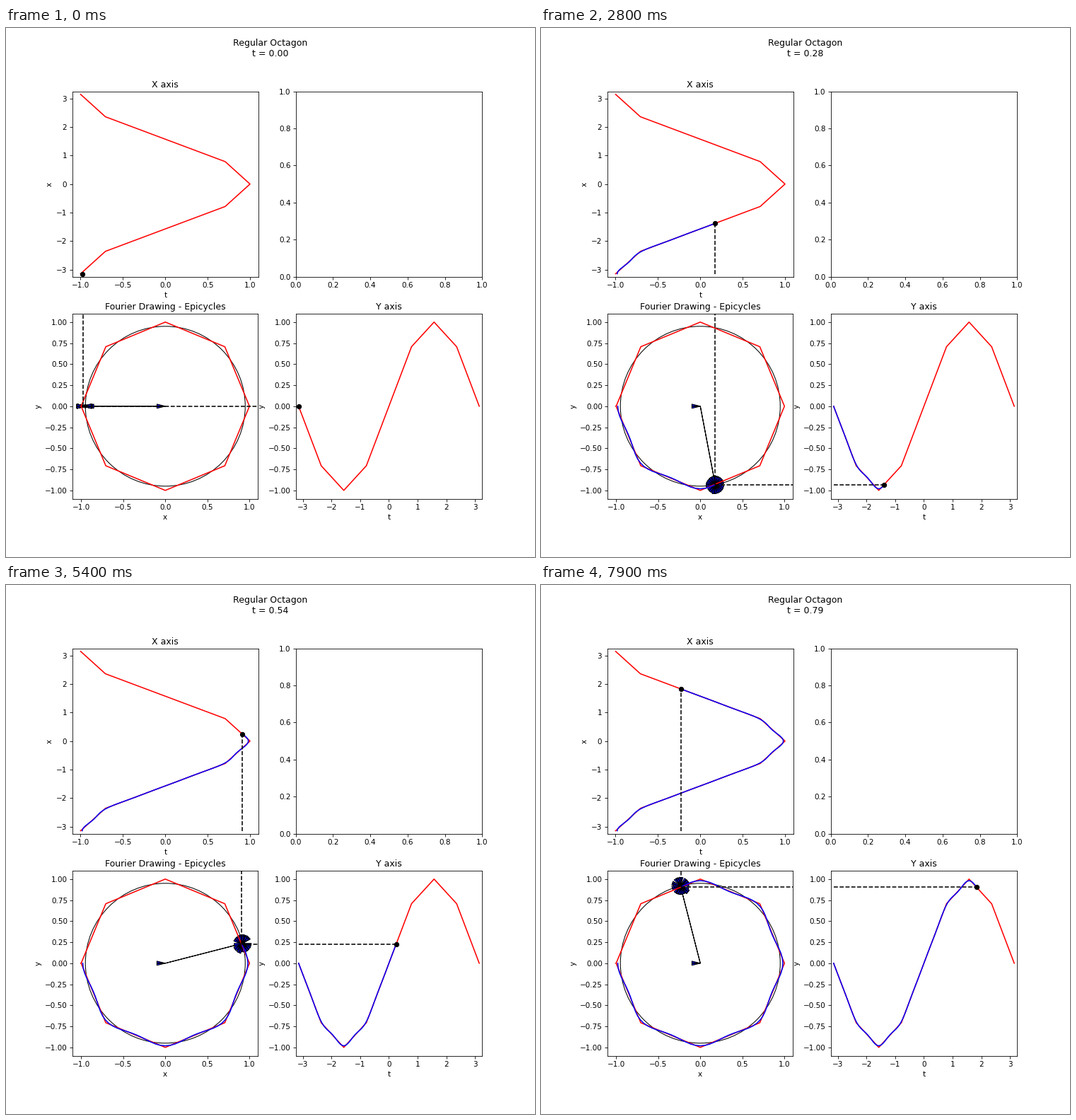
Animation of 748x748 px, one loop 8000 ms. Source, as a matplotlib script:

```python
import numpy as np
import matplotlib.pyplot as plt
from matplotlib.animation import FuncAnimation
from matplotlib.patches import Circle

FRAMES, STEPS = 80, 100
PI = np.pi
EDGE = 1.1

# Octagon traced once over [-pi, pi]
corners = np.linspace(-PI, PI, 9)
shape = np.exp(1j * corners)


def coefficient(n):
    """Fourier coefficient of the octagon; vanishing terms keep only a sign."""
    if n % 8 == 1:
        return (np.sin(PI / 8) / (PI / 8)) ** 2 / n ** 2
    sign = (-1) ** n if abs(n) < 8 else -(-1) ** n
    return sign * 1e-12


orders = [0] + [s * n for n in range(1, 11) for s in (1, -1)]
coefs = np.array([coefficient(n) for n in orders])
times = -PI + 2 * PI * np.arange(FRAMES) / STEPS
vectors = coefs * np.exp(1j * np.outer(times, orders))
joints = np.cumsum(vectors, axis=1)
path = joints[:, -1]

fig, ((ax_x, ax_off), (ax_xy, ax_y)) = plt.subplots(2, 2, figsize=(10, 10), dpi=74.8)
title = fig.suptitle("")


def setup(ax, name, xlabel, ylabel, xlim, ylim):
    ax.set(title=name, xlabel=xlabel, ylabel=ylabel,
           xlim=(-xlim, xlim), ylim=(-ylim, ylim))


setup(ax_x, "X axis", "t", "x", EDGE, PI + 0.1)
setup(ax_y, "Y axis", "t", "y", PI + 0.1, EDGE)
setup(ax_xy, "Fourier Drawing - Epicycles", "x", "y", EDGE, EDGE)
ax_xy.set_aspect("equal")

ax_x.plot(shape.real, corners, "r-")
ax_xy.plot(shape.real, shape.imag, "r-")
ax_y.plot(corners, shape.imag, "r-")


def empty(ax, style):
    return ax.plot([], [], style)[0]


trail_x, trail_xy, trail_y = (empty(ax, "b-") for ax in (ax_x, ax_xy, ax_y))
drop_x, drop_y = empty(ax_x, "k--"), empty(ax_y, "k--")
guide_v, guide_h = empty(ax_xy, "k--"), empty(ax_xy, "k--")
dot_x, dot_y = empty(ax_x, "ko"), empty(ax_y, "ko")

circles = {}
for i, c in enumerate(coefs):
    if abs(c) > 1e-6:
        circles[i] = ax_xy.add_patch(Circle((0, 0), abs(c), fill=False, ec="k"))
arrows = []


def update(k):
    t, x, y = times[k], path[k].real, path[k].imag
    title.set_text(f"Regular Octagon\nt = {k / STEPS:.2f}")

    ts, xs, ys = times[:k + 1], path.real[:k + 1], path.imag[:k + 1]
    trail_x.set_data(xs, ts)
    trail_xy.set_data(xs, ys)
    trail_y.set_data(ts, ys)

    dot_x.set_data([x], [t])
    dot_y.set_data([t], [y])
    drop_x.set_data([x, x], [-PI, t])
    drop_y.set_data([-PI, t], [y, y])
    guide_v.set_data([x, x], [y, EDGE])
    guide_h.set_data([x, EDGE], [y, y])

    while arrows:
        arrows.pop().remove()
    base = 0j
    for i, v in enumerate(vectors[k]):
        if i in circles:
            circles[i].center = base.real, base.imag
        arrows.append(ax_xy.arrow(
            base.real, base.imag, v.real, v.imag, head_width=0.05,
            head_length=0.1, length_includes_head=True, fc="b", ec="k"))
        base = joints[k, i]


anim = FuncAnimation(fig, update, frames=FRAMES, interval=100,
                     init_func=lambda: update(0), repeat=True, repeat_delay=0)
plt.show()
```
